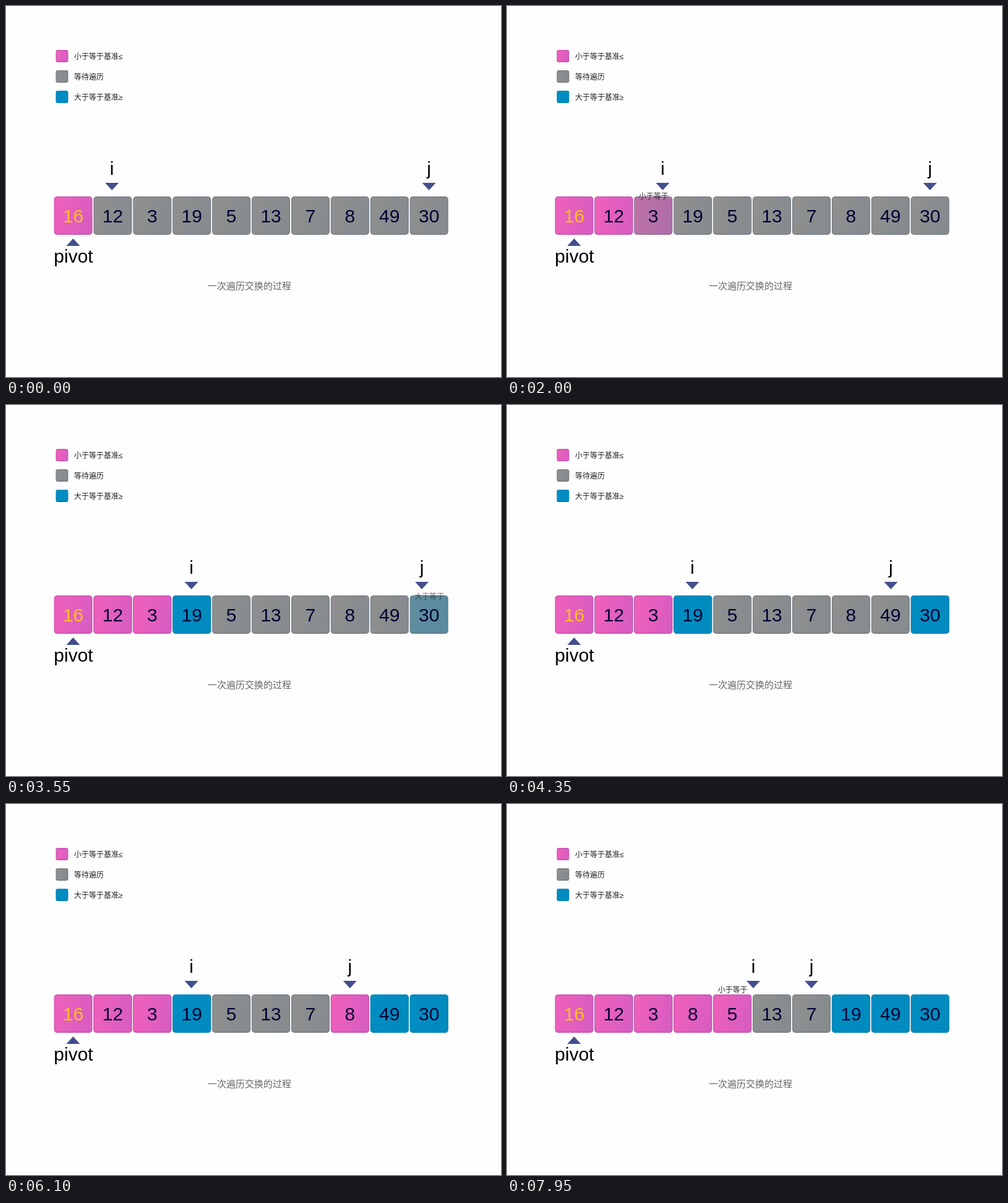
Animation of 800x600 px, one loop 8000 ms. Source, as an HTML page with a canvas:

```html
<!DOCTYPE html>
<html lang="zh-CN">
<head>
<meta charset="utf-8">
<title>Partition</title>
<style>
html, body { margin: 0; width: 100%; height: 100%; overflow: hidden; background: #fefefe; }
canvas { display: block; width: 800px; height: 600px; }
</style>
</head>
<body>
<canvas id="stage" width="800" height="600"></canvas>
<script>
const ctx = document.getElementById('stage').getContext('2d');
const LOOP = 8000, TICK = 50;
const FONT = '"Liberation Sans", "Noto Sans CJK SC", "Noto Sans CJK", sans-serif';
const CELL = 62, PITCH = 63.9, LEFT = 77.6, TOP = 308;
const HOP = 64.2, MOVE = 1000, MARK = 600;
const SWAP = { at: 6115, length: 500, a: 3, b: 7 };
const values = [16, 12, 3, 19, 5, 13, 7, 8, 49, 30];

const SKINS = {
  pink: { from: '#f160ba', to: '#d95dc1', edge: '#c552b2' },
  grey: { from: '#90908f', to: '#868b8e', edge: '#747b85' },
  blue: { from: '#008dc2', to: '#008bbf', edge: '#0083b6' }
};
const NOTES = { pink: '小于等于', blue: '大于等于' };

// Comparison of each cell with the pivot
const marks = [
  { cell: 1, at: 875, skin: 'pink' },
  { cell: 2, at: 1865, skin: 'pink' },
  { cell: 3, at: 2860, skin: 'blue' },
  { cell: 9, at: 3455, skin: 'blue' },
  { cell: 8, at: 4455, skin: 'blue' },
  { cell: 7, at: 5455, skin: 'pink' },
  { cell: 4, at: 7633, skin: 'pink' }
];
const hops = {
  i: [875, 1865, 6615, 7633],
  j: [3455, 4455, 6615]
};

const clamp = v => Math.max(0, Math.min(1, v));
const easeOut = p => 1 - (1 - p) * (1 - p);
const smooth = p => p * p * (3 - 2 * p);
const progress = (t, at, length) => clamp((t - at) / length);
const cellX = n => LEFT + n * PITCH;

function text(str, x, y, size, color, align = 'center') {
  ctx.font = `${size}px ${FONT}`;
  ctx.textAlign = align;
  ctx.fillStyle = color;
  ctx.fillText(str, x, y);
}

function tile(x, y, size, radius, skin) {
  const fill = ctx.createLinearGradient(x, y, x + size, y + size * 0.2);
  fill.addColorStop(0, skin.from);
  fill.addColorStop(1, skin.to);
  ctx.beginPath();
  ctx.roundRect(x, y, size, size, radius);
  ctx.fillStyle = skin.edge;
  ctx.fill();
  ctx.beginPath();
  ctx.roundRect(x + 1.2, y + 1.2, size - 2.4, size - 2.8, radius - 1);
  ctx.fillStyle = fill;
  ctx.fill();
}

function triangle(x, base, tip) {
  ctx.beginPath();
  ctx.moveTo(x - 11, base);
  ctx.lineTo(x + 11, base);
  ctx.lineTo(x, tip);
  ctx.closePath();
  ctx.fillStyle = '#434f8d';
  ctx.fill();
}

function pointer(name, x) {
  text(name, x, 273, 30, '#000');
  triangle(x, 286, 298);
}

function legend() {
  const rows = [['pink', '小于等于基准≤'], ['grey', '等待遍历'], ['blue', '大于等于基准≥']];
  rows.forEach(([skin, label], n) => {
    const y = 71 + n * 33;
    tile(80.5, y, 20, 3, SKINS[skin]);
    text(label, 110, y + 14.5, 12, '#222', 'left');
  });
}

function cell(n, t) {
  const shift = easeOut(progress(t, SWAP.at, SWAP.length)) * (SWAP.b - SWAP.a);
  const slot = n === SWAP.a ? n + shift : n === SWAP.b ? n - shift : n;
  const x = cellX(slot);
  const mark = marks.find(m => m.cell === n);
  tile(x, TOP, CELL, 5, SKINS[n ? 'grey' : 'pink']);
  if (mark) {
    ctx.globalAlpha = smooth(progress(t, mark.at, 350));
    tile(x, TOP, CELL, 5, SKINS[mark.skin]);
    ctx.globalAlpha = 1;
  }
  text(values[n], x + CELL / 2, 350, 30, n ? '#000033' : '#ffc01e');
}

// Notes rise out of the cell top, then fade
function note({ cell: n, at, skin }, t) {
  const age = t - at;
  if (age <= 0 || age >= MARK) return;
  ctx.globalAlpha = Math.min(1, age / 150, (MARK - age) / 290);
  text(NOTES[skin], cellX(n) + CELL / 2 + 0.5, 317.5 - age * 0.04, 12, '#222');
  ctx.globalAlpha = 1;
}

function draw(t) {
  const travel = name => hops[name].reduce((sum, at) => sum + easeOut(progress(t, at, MOVE)) * HOP, 0);
  ctx.fillStyle = '#fefefe';
  ctx.fillRect(0, 0, 800, 600);
  legend();
  values.forEach((_, n) => cell(n, t));
  marks.forEach(m => note(m, t));
  pointer('i', 171.2 + travel('i'));
  pointer('j', 683.6 - travel('j') * 0.995);
  triangle(108.5, 388, 376);
  text('pivot', 109, 415, 30, '#000');
  text('一次遍历交换的过程', 393.5, 457.5, 15, '#666');
}

const start = performance.now();
function frame() {
  const t = (performance.now() - start) % LOOP;
  draw(Math.floor(t / TICK) * TICK);
  requestAnimationFrame(frame);
}
frame();
</script>
</body>
</html>
```
